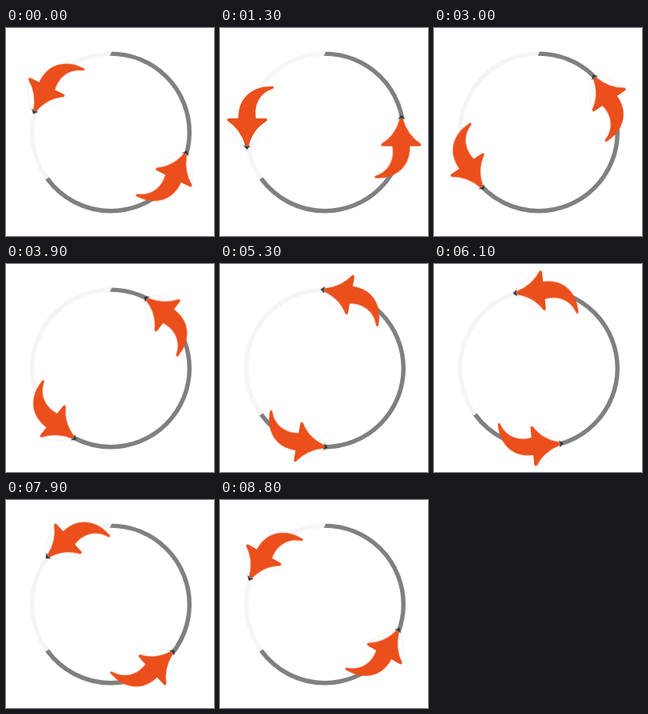
An HTML page for the animation above (8900 ms loop, 260 by 260 pixels).

```html
<!DOCTYPE html>
<html lang="en">
<head>
<meta charset="utf-8">
<title>Turning arrows</title>
<style>
  html, body { margin: 0; width: 100%; height: 100%; overflow: hidden; background: #fff; }
  svg { display: block; width: 100%; height: 100%; }
  .ring { fill: none; stroke-width: 5.4; }
  #arrows { transform-origin: 130.2px 130.4px; }
</style>
</head>
<body>
<svg viewBox="0 0 260 260">
  <defs>
    <g id="arrow">
      <path fill="#fff" stroke="#e6e6e6" stroke-width=".7"
        d="M9.5 115Q15 134 29.5 148H38Q52.5 134 58.5 115Z"/>
      <path fill="#ea4f1c"
        d="M66 73C43 72 22.500 85 23 113H11Q7.500 113.500 10 116.500Q26 127 31.500 147H36
           Q41 127 58 116.500Q60.500 113.500 57 113H45C42.500 98 48 82 66 76Q68.500 74 66 73Z"/>
      <path fill="#333" d="M29 146.800Q33.500 148 38 146.800L33.800 152Z"/>
    </g>
  </defs>
  <circle class="ring" cx="131" cy="130.400" r="98.300" stroke="#f5f5f5"/>
  <circle class="ring" cx="131" cy="130.400" r="98.300" stroke="#808080"
    pathLength="100" stroke-dasharray="65 35" transform="rotate(-90 131 130.400)"/>
  <g id="arrows">
    <use href="#arrow" transform="rotate(26 130.200 130.400)"/>
    <use href="#arrow" transform="rotate(206 130.200 130.400)"/>
  </g>
</svg>
<script>
  const STEPS = 89, STEP_MS = 100, STEP_DEG = -2;
  document.getElementById('arrows').animate(
    { transform: ['rotate(0deg)', `rotate(${STEPS * STEP_DEG}deg)`] },
    { duration: STEPS * STEP_MS, iterations: Infinity, easing: `steps(${STEPS}, end)` }
  );
</script>
</body>
</html>
```
